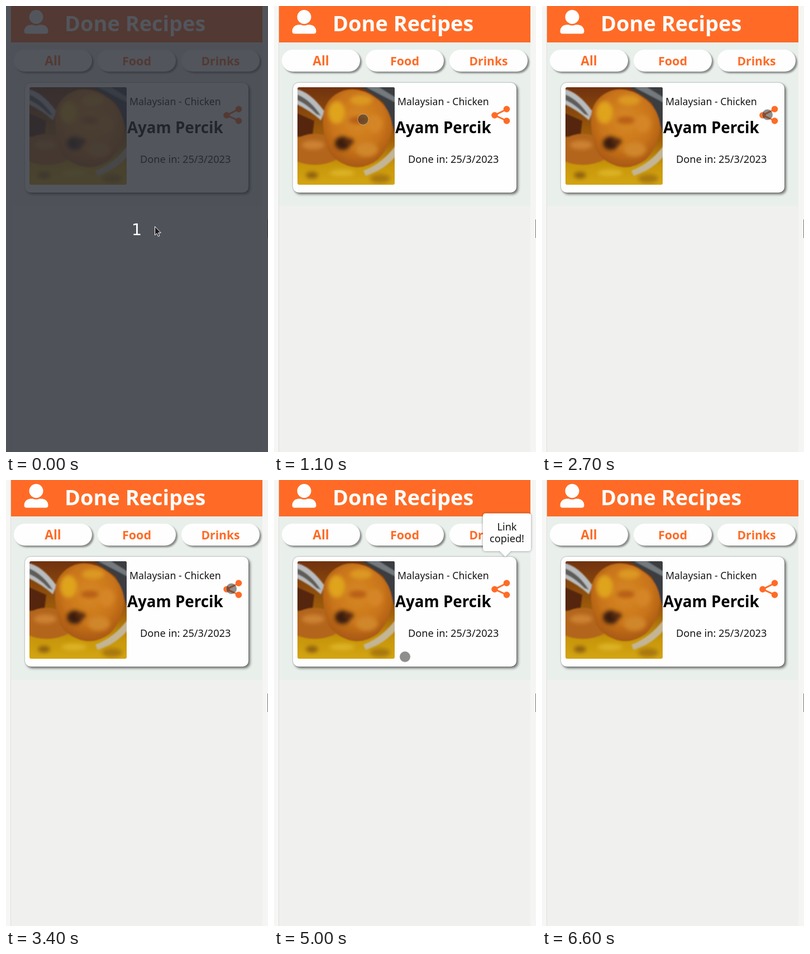
Animation, 469 px wide and 796 px high, one loop 7.7 s. Source, as an HTML page:

```html
<!DOCTYPE html>
<html lang="en">
<head>
<meta charset="utf-8">
<title>Done recipes</title>
<style>
  html, body { margin: 0; width: 100%; height: 100%; overflow: hidden; background: #f0f0ee; }
  svg { display: block; width: 100vw; height: 100vh; }
  text { font-family: "Noto Sans", "Open Sans", sans-serif; fill: #151515; }
  .mid { text-anchor: middle; }
  .bold { font-weight: 700; }
  .tab { fill: #ff6b26; }
  .raised { filter: drop-shadow(3px 3px 1.5px rgba(0, 0, 0, .42)); }
  .card { filter: drop-shadow(0 0 1px rgba(0, 0, 0, .4)) drop-shadow(3px 3px 2px rgba(0, 0, 0, .5)); }
  .tip { filter: drop-shadow(0 0 2px rgba(0, 0, 0, .4)); }
</style>
</head>
<body>
<svg viewBox="0 0 469 796">
  <defs>
    <linearGradient id="sauce" x2="0" y2="1">
      <stop offset="0" stop-color="#71320f"/>
      <stop offset=".55" stop-color="#a3620a"/>
      <stop offset=".8" stop-color="#c8960a"/>
      <stop offset="1" stop-color="#d3a514"/>
    </linearGradient>
    <radialGradient id="meat" cx=".5" cy=".4" r=".62">
      <stop offset="0" stop-color="#d88a24"/>
      <stop offset=".6" stop-color="#c9741b"/>
      <stop offset="1" stop-color="#a55510"/>
    </radialGradient>
    <clipPath id="photo"><rect x="42" y="145" width="174" height="174" rx="3"/></clipPath>
    <filter id="soft"><feGaussianBlur stdDeviation="1.2"/></filter>
    <filter id="softer"><feGaussianBlur stdDeviation="3.5"/></filter>
  </defs>

  <rect width="469" height="796" fill="#f0f0ee"/>
  <rect width="8" height="796" fill="#f6f6f5"/>
  <rect x="459" width="10" height="796" fill="#f5f5f3"/>
  <rect x="8" width="1" height="796" fill="#dededc"/>
  <rect x="9" y="65" width="450" height="292" fill="#e9efeb"/>
  <rect x="468" y="381" width="1" height="33" fill="#777"/>

  <rect x="9" width="450" height="65" fill="#ff6b26"/>
  <g fill="#fefefe">
    <circle cx="54" cy="19.5" r="12.5"/>
    <path d="M43 33.500H48Q54 36 60 33.500H65Q75 35 75.500 45Q75.500 49.500 71 49.500H37Q32.500 49.500 32.500 45Q33 35 43 33.500Z"/>
  </g>
  <text class="bold" x="105" y="45" font-size="37.9" style="fill:#fefefe">Done Recipes</text>

  <g id="tabs"></g>

  <rect class="card" x="34" y="137" width="400" height="196" rx="10" fill="#fefefe"/>
  <g clip-path="url(#photo)">
    <rect x="42" y="145" width="174" height="174" fill="url(#sauce)"/>
    <g filter="url(#soft)">
      <path d="M150 140H222V240L196 172Z" fill="#3a3c3f"/>
      <path d="M165 145H188L217 163V172Z" fill="#73797d"/>
      <path d="M38 190L72 205L68 238L38 232Z" fill="#54250f"/>
      <path d="M38 148Q64 152 90 188L84 204Q64 186 38 174Z" fill="#b9bcbe"/>
      <path d="M42 158Q66 168 84 196L76 193Q60 176 42 168Z" fill="#5d5b58"/>
      <path d="M160 294Q196 280 220 246V266Q196 294 164 303Z" fill="#c3b595"/>
      <path d="M38 238Q66 222 96 232L112 274Q76 292 38 276Z" fill="#b3651a"/>
      <path d="M88 192Q94 162 124 151Q154 143 182 164Q208 181 212 216Q209 250 186 274Q158 295 130 284Q98 272 93 244Q86 218 88 192Z" fill="url(#meat)"/>
    </g>
    <g filter="url(#softer)">
      <ellipse cx="123" cy="245" rx="14" ry="12" fill="#3a1c0c"/>
      <ellipse cx="134" cy="242" rx="9" ry="6" fill="#5a2c10"/>
      <ellipse cx="112" cy="190" rx="15" ry="20" fill="#dfa31f"/>
      <ellipse cx="156" cy="168" rx="20" ry="9" fill="#dc9824"/>
      <ellipse cx="150" cy="204" rx="16" ry="7" fill="#b85f14"/>
      <ellipse cx="180" cy="210" rx="14" ry="16" fill="#d58525"/>
      <ellipse cx="166" cy="256" rx="20" ry="13" fill="#d0862a"/>
      <ellipse cx="70" cy="248" rx="20" ry="8" fill="#cc8230"/>
      <ellipse cx="68" cy="302" rx="11" ry="6" fill="#8f600a"/>
      <ellipse cx="122" cy="298" rx="22" ry="6" fill="#dcb325"/>
      <ellipse cx="190" cy="308" rx="18" ry="8" fill="#a9780c"/>
    </g>
  </g>
  <text x="221" y="177" font-size="17.7">Malaysian - Chicken</text>
  <text class="bold" x="217" y="227" font-size="27.7" style="fill:#000">Ayam Percik</text>
  <text x="240" y="280" font-size="18.2">Done in: 25/3/2023</text>
  <g fill="#ff6b26">
    <path d="M417 184L395 195L417 205" fill="none" stroke="#ff6b26" stroke-width="3"/>
    <circle cx="395" cy="195" r="5.8"/>
    <circle cx="416.5" cy="184" r="5.8"/>
    <circle cx="416.5" cy="205" r="5.8"/>
  </g>

  <g id="tip">
    <path class="tip" d="M379 59.500H455Q460 59.500 460 64.500V122Q460 127 455 127H424L414 137L404 127H379Q374 127 374 122V64.500Q374 59.500 379 59.500Z" fill="#fefefe"/>
    <text class="mid" x="417" y="90" font-size="18.1">Link</text>
    <text class="mid" x="417" y="111" font-size="18.2">copied!</text>
  </g>

  <circle id="touch" r="9.7" fill="rgba(50,50,45,.55)" stroke="rgba(255,255,255,.4)"/>

  <g id="countdown">
    <rect width="469" height="796" fill="rgba(43,46,55,.81)"/>
    <text class="mid" x="234" y="409" font-size="29" style="fill:#fff;font-family:'DejaVu Sans',sans-serif">1</text>
    <path d="M266.500 393.500V409L270 405.800L272.500 411.200L275 410L272.600 404.800H277.300Z" fill="#1c1c1e" stroke="#fff"/>
  </g>
</svg>
<script>
const LOOP = 7700, STEP = 100;
const $ = id => document.getElementById(id);

$("tabs").innerHTML = [["All", 22.6], ["Food", 21.5], ["Drinks", 21.1]].map(([label, size], i) => {
  const x = 14 + 150 * i;
  return `<rect class="raised" x="${x}" y="78" width="140" height="39" rx="19.5" fill="#fefefe"/>
    <text class="mid bold tab" x="${x + 70}" y="106" font-size="${size}">${label}</text>`;
}).join("");

// Pointer waypoints: time in ms, x, y
const path = [
  [400, 267.5, 394.5], [600, 298, 325], [800, 232, 200], [1000, 139, 185],
  [1100, 159.5, 202.5], [1200, 139, 245], [1400, 195, 310], [1600, 295, 245],
  [1800, 365, 161], [1900, 383, 168], [2500, 401, 194], [2600, 401, 194],
  [2700, 403.5, 194], [4400, 403.5, 194], [4700, 330, 235], [5000, 234.5, 315.5],
  [5200, 245, 362], [5400, 243, 355], [5700, 215, 230], [6000, 177, 66],
  [6300, 110, 32], [6500, 58, 2], [6600, 45, -20]
];

function pointAt(t) {
  const next = path.findIndex(p => p[0] > t);
  if (next === 0) return path[0].slice(1);
  if (next < 0) return path[path.length - 1].slice(1);
  const a = path[next - 1], b = path[next];
  const k = (t - a[0]) / (b[0] - a[0]);
  return [1, 2].map(i => a[i] + (b[i] - a[i]) * k);
}

const show = (id, on) => $(id).setAttribute("visibility", on ? "visible" : "hidden");

function draw(now) {
  const t = Math.floor((now % LOOP) / STEP) * STEP;
  const [x, y] = pointAt(t);
  $("touch").setAttribute("transform", `translate(${x} ${y})`);
  show("countdown", t < 100);
  show("touch", t >= 100 && t < 6600);
  show("tip", t >= 3700 && t < 5400);
}

const start = performance.now();
function tick() {
  draw(performance.now() - start);
  requestAnimationFrame(tick);
}
tick();
</script>
</body>
</html>
```
